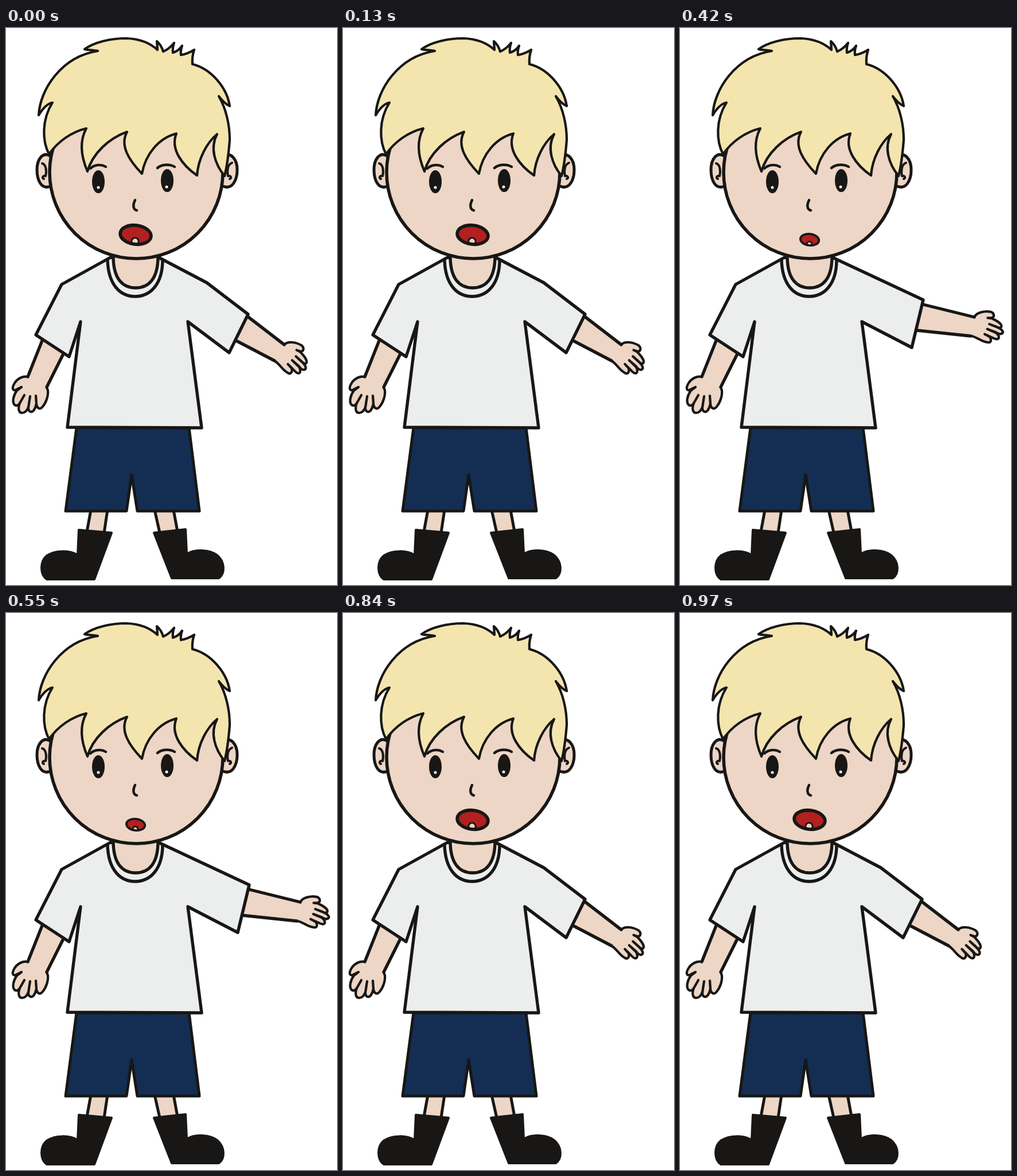
Animation, 577 px wide and 971 px high, one loop 1.05 s. Source, as an HTML page with a canvas:

```html
<!DOCTYPE html>
<html lang="en">
<head>
<meta charset="utf-8">
<title>Waving boy</title>
<style>
html, body { margin: 0; width: 100%; height: 100%; overflow: hidden; background: #fff; }
canvas { display: block; }
</style>
</head>
<body>
<canvas id="stage" width="577" height="971"></canvas>
<script>
const ctx = document.getElementById('stage').getContext('2d');
const INK = '#181716', SKIN = '#edd6c5', HAIR = '#f4e5af', SHIRT = '#ebeeed', NAVY = '#142e53', RED = '#b32020';
const STEP = 210;
const ORDER = [0, 1, 2, 1, 0];

// Arm points: top and bottom at the cuff, then top and bottom at the wrist.
const POSES = [
  { sleeve: 'L389 566L422 499L350 444', arm: [[420, 502], [403, 546], [485, 552], [468, 580]], turn: 11.5,
    mouth: [226, 360.5, 27, 16.5], line: 5.8, tongue: [225, 372, 6.2] },
  { sleeve: 'L404 557L424 474', arm: [[420, 483], [412, 529], [502, 521], [491, 552]], turn: 0,
    mouth: [227, 365, 21, 13], line: 4.6, tongue: [226.5, 374.5, 5.2] },
  { sleeve: 'L404 557L424 474', arm: [[420, 481], [412, 527], [513, 504], [507, 537]], turn: -9.5,
    mouth: [226, 369, 16.2, 10], line: 3.8, tongue: [225.5, 376.5, 4.2] }
];

const HAND = 'M502 521C507 513 522 513 531 516C538 519 538 526 532 527L525 526L532 528' +
  'C541 534 548 541 546 545C544 548 541 546 538 544L526 537L539 545' +
  'C547 550 549 555 545 557C542 558 538 556 535 553L521 545L535 554' +
  'C541 561 539 566 534 565C530 564 527 561 524 559L515 553L523 559' +
  'C526 566 523 570 518 568C507 565 502 556 491 552';

const LEFT_HAND = 'M38 608C30 606 20 611 15 619C10 627 11 633 17 631L27 626L19 632' +
  'C13 640 10 652 15 657C19 660 22 657 24 654L32 640L24 654' +
  'C20 665 23 671 28 671C34 671 37 666 39 661L42 642L39 662' +
  'C39 669 44 671 48 667C51 663 52 660 53 655L52 641L53 656' +
  'C55 665 60 665 64 660C70 653 74 641 73 632L71 626';

const HAIR_PATH = 'M75 220C63 197 62 160 81 130C71 132 63 142 57 152C59 108 96 50 160 40C152 38 145 39 137 37' +
  'C153 25 182 18 210 18C234 19 251 26 264 38L263 23Q271 30 274 41Q284 37 293 26Q290 34 291 43' +
  'Q301 40 307 31Q304 39 305 47Q317 45 328 38Q324 50 325 63C357 71 385 103 390 136C383 133 377 127 371 119' +
  'C384 141 390 170 390 195C388 220 385 242 381 258C364 237 355 209 368 185C350 200 335 228 333 257' +
  'C307 239 286 211 297 184C266 192 243 220 237 254C214 230 198 205 211 181C180 192 151 218 142 250' +
  'C130 222 128 197 140 175C115 181 91 197 75 220Z';

function shape(d, fill, width = 5.4) {
  const p = new Path2D(d);
  if (fill) { ctx.fillStyle = fill; ctx.fill(p); }
  if (width) { ctx.lineWidth = width; ctx.stroke(p); }
}

function oval(x, y, rx, ry, fill, width = 0, tilt = 0) {
  ctx.beginPath();
  ctx.ellipse(x, y, rx, ry, tilt, 0, Math.PI * 2);
  ctx.fillStyle = fill;
  ctx.fill();
  if (width) { ctx.lineWidth = width; ctx.stroke(); }
}

function legs() {
  shape('M148 840L141 878L171 880L177 840', SKIN, 5);
  shape('M259 840L268 880L299 878L292 840', SKIN, 5);
  shape('M127 875L184 880L154 961L71 961C59 952 59 930 71 920C86 910 111 910 125 919Z', INK, 4);
  shape('M258 880L313 874L315 917C330 908 355 909 368 919C382 931 382 951 371 959L289 959Z', INK, 4);
  shape('M123 697L104 842L210 842L219 779L229 842L337 842L319 697Z', NAVY, 5);
}

function rightArm({ arm: [a, b, c, d], turn }) {
  shape(`M${a}L${c}L${d}L${b}Z`, SKIN, 0);
  ctx.save();
  ctx.translate((c[0] + d[0]) / 2, (c[1] + d[1]) / 2);
  ctx.rotate(turn * Math.PI / 180);
  ctx.translate(-496.5, -536.5);
  shape(HAND, SKIN, 4.2);
  ctx.restore();
  shape(`M${a}L${c}M${b}L${d}`, null);
}

function torso(pose) {
  shape('M65 540L38 608L71 626L100 568Z', SKIN, 0);
  shape(LEFT_HAND, SKIN, 4.2);
  shape('M65 540L38 608M100 568L71 626', null);
  rightArm(pose);
  shape(`M182 400L97 447L52 535L110 573L130 512L107 696L341 697L317 512${pose.sleeve}L268 401Z`, SHIRT);
  shape('M177 404C178 446 198 468 225 468C252 468 273 446 273 404', null);
  shape('M187 398C187 437 203 453 226 453C249 453 265 437 265 398', SKIN);
}

function mouth({ mouth: [x, y, rx, ry], line, tongue: [tx, ty, r] }) {
  const tilt = 0.12;
  oval(x, y, rx, ry, RED, 0, tilt);
  ctx.save();
  ctx.clip();
  oval(tx, ty, r, r, SKIN, 3);
  ctx.restore();
  ctx.beginPath();
  ctx.ellipse(x, y, rx, ry, tilt, 0, Math.PI * 2);
  ctx.lineWidth = line;
  ctx.stroke();
}

function head(pose) {
  shape('M77 223C64 215 54 229 54 247C54 266 62 282 77 276', SKIN, 5);
  shape('M378 223C392 215 403 229 403 247C403 266 394 282 379 276', SKIN, 5);
  shape('M63 236C70 238 71 249 69 258C64 257 62 262 66 263', null, 4);
  shape('M394 235C386 238 385 249 387 258C392 257 394 262 390 263', null, 4);
  oval(227, 251.5, 151, 150.5, SKIN, 5.6);
  shape(HAIR_PATH, HAIR, 4.2);
  shape('M147 245C154 238 166 237 174 242M264 244C272 237 286 237 294 242', null, 4.4);
  oval(161, 268, 11, 20, INK);
  oval(281, 266, 11, 20, INK);
  oval(161, 278, 2.5, 2.5, '#fff');
  oval(280, 277, 2.5, 2.5, '#fff');
  shape('M225 300C221 308 221 316 228 318', null, 4.5);
  mouth(pose);
}

function draw(time) {
  const pose = POSES[ORDER[Math.floor(time / STEP) % ORDER.length]];
  ctx.fillStyle = '#fff';
  ctx.fillRect(0, 0, 577, 971);
  ctx.strokeStyle = INK;
  ctx.lineJoin = ctx.lineCap = 'round';
  legs();
  torso(pose);
  head(pose);
}

let start;
function tick(now) {
  start ??= now;
  draw(Math.max(0, now - start));
  requestAnimationFrame(tick);
}
draw(0);
requestAnimationFrame(tick);
</script>
</body>
</html>
```
